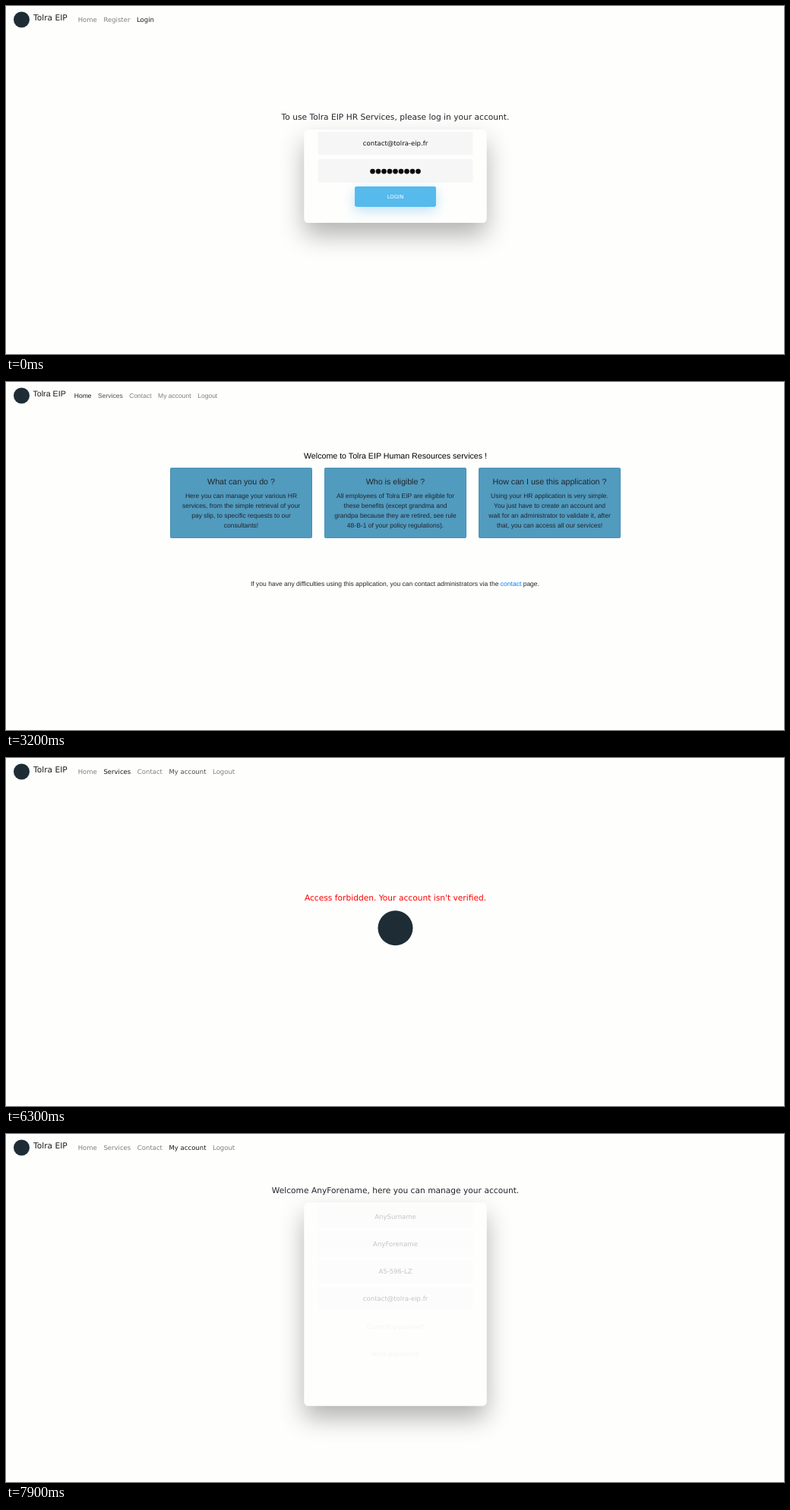
Write an HTML page with a canvas that moves like this. It is 1024 px wide and 459 px high and loops after 8 s.

```html
<!DOCTYPE html>
<html lang="en">
<head>
<meta charset="utf-8">
<title>HR portal</title>
<style>
  html, body { margin: 0; width: 100%; height: 100%; overflow: hidden; background: #fefefe; }
  canvas { display: block; width: 100%; height: 100%; }
</style>
</head>
<body>
<canvas width="1024" height="459"></canvas>
<script>
const ctx = document.querySelector('canvas').getContext('2d');
const LOOP = 8000, STEP = 100;
const SCALE = 1024 / 1920;          // page is 1920 px wide
const CX = 512.5;
const WRAPPER = 352;                // height of the sliding wrapper
const SANS = '"DejaVu Sans", sans-serif', ARIAL = '"Liberation Sans", sans-serif';
const BG = '#fefefd', INK = '#212529', LOGO = '#1e2d35';
const BRAND = 'Tolra EIP', EMAIL = 'contact@tolra-eip.fr';
const MEMBER = ['Home', 'Services', 'Contact', 'My account', 'Logout'];

const clamp = x => Math.min(1, Math.max(0, x));
const mix = (a, b, p) => a.map((v, i) => v + (b[i] - v) * p);
const rgb = c => `rgb(${c.map(Math.round)})`;

function bezier(x1, y1, x2, y2) {
  const at = (a, b, s) => 3 * a * s * (1 - s) ** 2 + 3 * b * s * s * (1 - s) + s ** 3;
  return x => {
    if (x <= 0 || x >= 1) return clamp(x);
    let lo = 0, hi = 1;
    for (let i = 0; i < 24; i++) {
      const mid = (lo + hi) / 2;
      if (at(x1, x2, mid) < x) lo = mid; else hi = mid;
    }
    return at(y1, y2, lo);
  };
}
const ease = bezier(.25, .1, .25, 1);
const easeIn = bezier(.42, 0, 1, 1);
const easeInOut = bezier(.42, 0, .58, 1);

// Draws text and returns its width.
function text(str, x, y, size, color = INK, family = SANS, align = 'center') {
  ctx.font = `${size * SCALE}px ${family}`;
  ctx.textRendering = 'geometricPrecision';
  ctx.textAlign = align;
  ctx.fillStyle = color;
  ctx.fillText(str, x, y);
  return ctx.measureText(str).width;
}

function box(x, y, w, h, r, color) {
  ctx.fillStyle = color;
  ctx.beginPath();
  ctx.roundRect(x, y, w, h, r);
  ctx.fill();
}

function disc(x, y, r, color) {
  ctx.fillStyle = color;
  ctx.beginPath();
  ctx.arc(x, y, r, 0, 2 * Math.PI);
  ctx.fill();
}

function withAlpha(alpha, draw) {
  ctx.save();
  ctx.globalAlpha *= alpha;
  draw();
  ctx.restore();
}

function withShadow(color, dy, blur, draw) {
  ctx.save();
  ctx.shadowColor = color;
  ctx.shadowOffsetY = dy * SCALE;
  ctx.shadowBlur = blur * SCALE;
  draw();
  ctx.restore();
}

function nav(items, active, hover, family = SANS) {
  disc(20.5, 18, 10.5, LOGO);
  const arial = family === ARIAL;
  text(BRAND, arial ? 35.5 : 36, 18.8, 20, 'rgba(0,0,0,.9)', family, 'left');
  let x = arial ? 89.8 : 94.7;
  for (const item of items) {
    const alpha = item === active ? .9 : item === hover ? .7 : .5;
    x += text(item, x, 20.9, 16, `rgba(0,0,0,${alpha})`, family, 'left') + 16 * SCALE;
  }
}

function card(y, h) {
  const shape = () => box(392.5, y, 240, h, 10 * SCALE, BG);
  withShadow('rgba(0,0,0,.3)', 30, 60, shape);
  // Keep the inside clean while the card is translucent.
  ctx.save();
  ctx.globalAlpha = 1;
  shape();
  ctx.restore();
}

function field(cardTop, row, label, color = '#0d0d0d') {
  const y = cardTop + (5 + 68 * row) * SCALE;
  box(410.5, y, 204, 58 * SCALE, 5 * SCALE, '#f6f6f6');
  if (label) text(label, CX, y + 18.5, 16, color);
}

function loginButton(t) {
  const hover = easeInOut(clamp((t - 550) / 300));
  const press = clamp((t - 1250) / 300), focus = easeInOut(press);
  const w = 200 * SCALE, h = 50 * SCALE, r = 5 * SCALE, ring = 3.2 * SCALE;
  const scale = 1 - .03 * Math.sin(Math.PI * press);
  const fill = rgb(mix([86, 186, 237], [57, 172, 231], hover));
  ctx.save();
  ctx.translate(CX, 251.3);
  ctx.scale(scale, scale);
  withAlpha(1 - focus, () =>
    withShadow('rgba(95,186,233,.4)', 10, 30, () => box(-w / 2, -h / 2, w, h, r, fill)));
  withAlpha(focus, () =>
    box(-w / 2 - ring, -h / 2 - ring, w + 2 * ring, h + 2 * ring, r + ring, 'rgba(0,123,255,.25)'));
  box(-w / 2, -h / 2, w, h, r, fill);
  text('LOGIN', 0, 2.4, 13, rgb(mix([255, 255, 255], [33, 37, 41], hover)));
  ctx.restore();
}

function loginPage(t) {
  nav(['Home', 'Register', 'Login'], 'Login');
  const top = 163;
  card(top, 123);
  text(`To use ${BRAND} HR Services, please log in your account.`, CX, 149.9, 20);
  field(top, 0, EMAIL);
  field(top, 1);
  for (let i = -4; i <= 4; i++) disc(CX + i * 7.5, 218.1, 3.35, '#0d0d0d');
  loginButton(t);
}

const PANELS = [
  ['What can you do ?',
    'Here you can manage your various HR',
    'services, from the simple retrieval of your',
    'pay slip, to specific requests to our',
    'consultants!'],
  ['Who is eligible ?',
    `All employees of ${BRAND} are eligible for`,
    'these benefits (except grandma and',
    'grandpa because they are retired, see rule',
    '48-B-1 of your policy regulations).'],
  ['How can I use this application ?',
    'Using your HR application is very simple.',
    'You just have to create an account and',
    'wait for an administrator to validate it, after',
    'that, you can access all our services!']
];

function homePage(t) {
  nav(MEMBER, 'Home', t >= 3200 && 'Services', ARIAL);
  text(`Welcome to ${BRAND} Human Resources services !`, CX, 100.6, 20, '#000', ARIAL);
  PANELS.forEach(([title, ...lines], i) => {
    const x = 216 + 203 * i, mid = x + 93.5;
    box(x, 113, 187, 93, 2.1, '#4788a7');
    box(x + .53, 113.53, 185.94, 91.94, 1.6, '#519bbf');
    text(title, mid, 134.6, 20, INK, ARIAL);
    lines.forEach((line, n) => text(line, mid, 153.3 + 12.8 * n, 16, INK, ARIAL));
  });
  let x = 322;
  for (const [part, color] of [
    ['If you have any difficulties using this application, you can contact administrators via the ', INK],
    ['contact', '#007bff'],
    [' page.', INK]
  ]) x += text(part, x, 269.2, 16, color, ARIAL, 'left');
}

// Content drops in from one wrapper height above while it fades in.
function fadeInDown(elapsed, draw) {
  const p = ease(clamp(elapsed / 1000));
  ctx.save();
  ctx.translate(0, (p - 1) * WRAPPER);
  withAlpha(p, draw);
  ctx.restore();
}

function servicesPage(t) {
  nav(MEMBER, 'Services', t >= 6300 && 'My account');
  fadeInDown(t - 3936, () => {
    text("Access forbidden. Your account isn't verified.", CX, 188, 20, '#f00');
    disc(CX, 224.3, 23, LOGO);
  });
}

function accountPage(t) {
  nav(MEMBER, 'My account');
  const elapsed = t - 6883, top = 90.5;
  const fadeIn = delay => easeIn(clamp((elapsed - delay) / 1000));
  fadeInDown(elapsed, () => {
    card(top, 268);
    text('Welcome AnyForename, here you can manage your account.', CX, 77.6, 20);
    withAlpha(fadeIn(600), () =>
      ['AnySurname', 'AnyForename', 'A5-596-LZ', EMAIL].forEach((s, i) => field(top, i, s)));
    withAlpha(fadeIn(800), () =>
      ['Current password', 'New password'].forEach((s, i) => field(top, i + 4, s, '#757575')));
  });
}

function frame(now) {
  const t = Math.floor(now / STEP) * STEP % LOOP;
  ctx.fillStyle = BG;
  ctx.fillRect(0, 0, 1024, 459);
  const page = t < 1800 ? loginPage : t < 4000 ? homePage : t < 6900 ? servicesPage : accountPage;
  page(t);
  requestAnimationFrame(frame);
}
requestAnimationFrame(frame);
</script>
</body>
</html>
```
